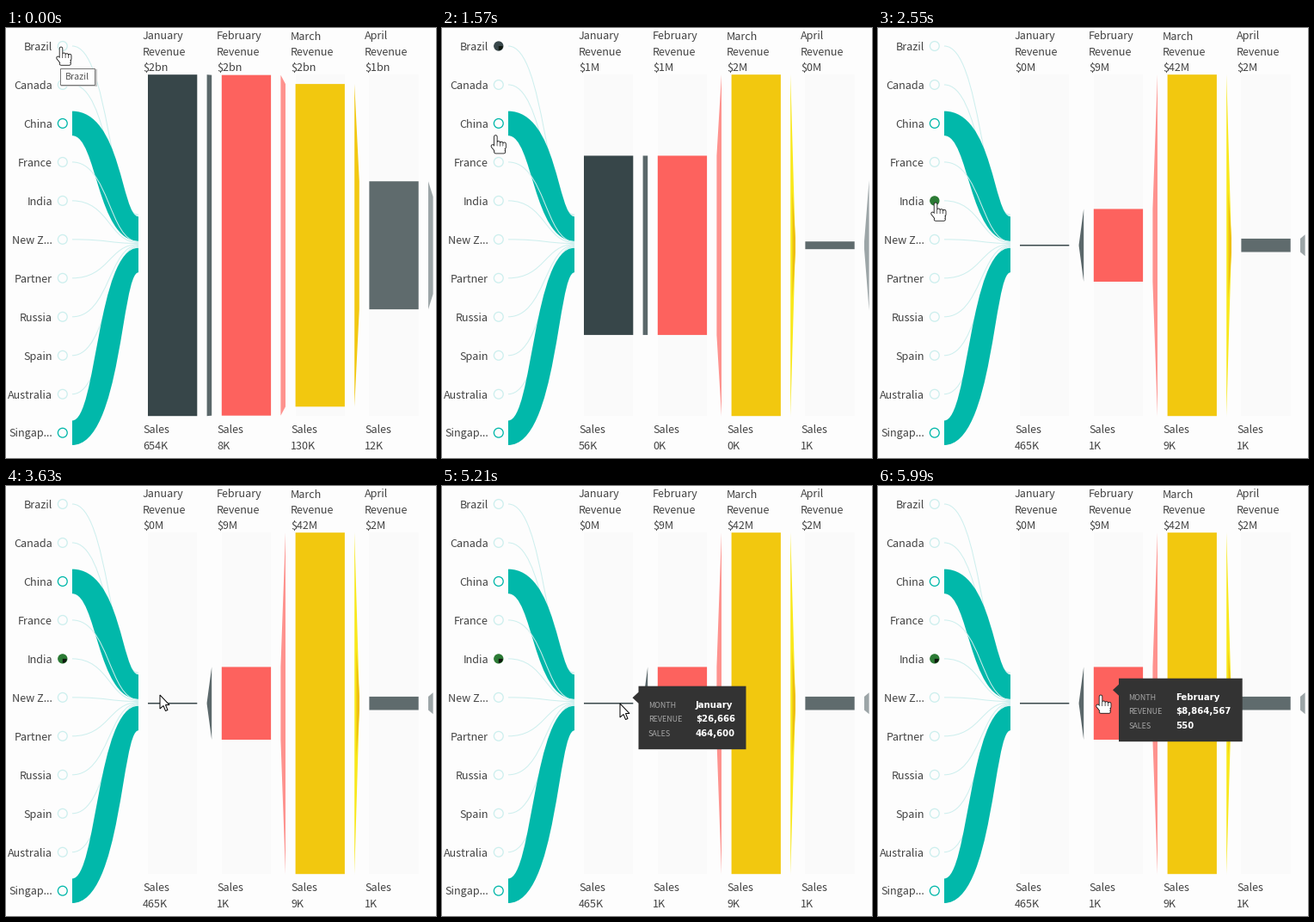
These frames come from a looping animation (500x500 px, 6630 ms). A matplotlib script:

```python
import numpy as np
import matplotlib.pyplot as plt
from matplotlib.animation import FuncAnimation
from matplotlib.patches import Circle, PathPatch, Polygon, Rectangle, Wedge
from matplotlib.path import Path

SIZE, DPI = 500, 100
LOOP, STEP = 6630, 30
PT = 72 / DPI  # points per pixel
MID, FULL = 252.7, 198.5  # centre and largest half height of the bars
PITCH, BAR_WIDTH = 85.8, 57.3
RIBBON = 28.5

TEAL, PALE, DARK, GREEN, BACK = "#01b8aa", "#cdefee", "#374649", "#2b7a34", "#fdfdfd"
BAR_COLORS = [DARK, "#fd625e", "#f2c80f", "#5f6b6d"]
LINK_COLORS = ["#5a676a", "#fe928e", "#f2c811", "#9ca5a7"]
SANS = ["Noto Sans CJK JP", "DejaVu Sans"]

COUNTRIES = ["Brazil", "Canada", "China", "France", "India", "New Z...",
             "Partner", "Russia", "Spain", "Australia", "Singap..."]
BIG = {"China": MID - 19.2, "Singap...": MID + 17.3}  # ribbon end heights
MONTHS = ["January", "February", "March", "April"]

# Revenue (the last month is off stage), its unit, sales in thousands
ALL = ([2, 1.995, 1.89, 0.75, 0.57], "bn", [654, 8, 130, 12])
BRAZIL = ([1.05, 1.05, 2, 0.045, 0.76], "M", [56, 0, 0, 1])
INDIA = ([0.027, 8.86, 41.6, 1.63, 2.62], "M", [465, 1, 9, 1])

# Pointer moves: start, end, new tip position
HOME = (64, 22)
MOVES = [(1030, 1700, (62, 147)), (1760, 2360, (67, 203)),
         (3530, 3680, (207, 253)), (5340, 5710, (259, 243))]

fig = plt.figure(figsize=(SIZE / DPI, SIZE / DPI), dpi=DPI, facecolor=BACK)
ax = fig.add_axes([0, 0, 1, 1])
ax.set(xlim=(0, SIZE), ylim=(SIZE, 0))
ax.axis("off")


def label(x, y, text, px=12.6, color="#444444", **kw):
    kw.setdefault("family", SANS)
    return ax.text(x, y, text, fontsize=px * PT, color=color, va="baseline", **kw)


def row_y(i):
    return 21 + 44.97 * i


def curve(y0, y1, bend=120):
    return [(77, y0), (bend, y0), (bend, y1), (154, y1)]


def thread(y0, y1, z):
    path = Path(curve(y0, y1), [Path.MOVETO] + [Path.CURVE4] * 3)
    ax.add_patch(PathPatch(path, fill=False, ec=PALE, lw=PT, zorder=z))


def ribbon(y0, y1, z):
    half = RIBBON / 2
    lean = half * np.sign(y1 - y0)
    top = curve(y0 - half, y1 - half, 120 + lean)
    bottom = curve(y0 + half, y1 + half, 120 - lean)[::-1]
    codes = [Path.MOVETO] + [Path.CURVE4] * 3 + [Path.LINETO] + [Path.CURVE4] * 3
    ax.add_patch(PathPatch(Path(top + bottom, codes), fc=TEAL, lw=0, zorder=z))


def shape(points, color, **kw):
    return ax.add_patch(Polygon(points, fc=color, **{"lw": 0, "snap": False, **kw}))


def trapezoid(x, width, half0, half1):
    return [(x, MID - half0), (x + width, MID - half1),
            (x + width, MID + half1), (x, MID + half0)]


def card(x, y, width, values):
    height = 73.5
    parts = [shape([(x, y), (x + width, y), (x + width, y + height), (x, y + height),
                    (x, y + 20), (x - 7, y + 13.5), (x, y + 7)], "#333333", zorder=20)]
    for i, (name, value) in enumerate(zip(("MONTH", "REVENUE", "SALES"), values)):
        base = y + 24.9 + 16.6 * i
        parts.append(label(x + 11.5, base, name, 8.9, "#a6a6a6", zorder=21))
        parts.append(label(x + 66.2, base, value, 10.1, "white",
                           family="DejaVu Sans", weight="bold", zorder=21))
    return parts


def fade(parts, alpha):
    for part in parts:
        part.set_alpha(alpha)
        part.set_visible(alpha > 0)


# Country list; later ribbons lie over earlier ones
rings = []
for i, name in enumerate(COUNTRIES):
    y, z = row_y(i), 1 + i / 20
    label(54, y + 4.8, name, ha="right")
    rings.append(ax.add_patch(Circle((65.8, y), 5.4, fc=BACK, lw=1.3 * PT, zorder=3,
                                     ec=TEAL if name in BIG else PALE)))
    if name in BIG:
        ribbon(y, BIG[name], z)
    else:
        thread(y, 245.5 + i - RIBBON * (i < 2), z)
shade = ax.add_patch(Wedge((0, 0), 5, 0, 90, fc="#10180f", lw=0, zorder=4))

# Funnel
bars, links, revenues, sales = [], [], [], []
for i, month in enumerate(MONTHS):
    text_x = 159 + 86 * i
    ax.add_patch(Rectangle((165 + PITCH * i, MID - FULL), BAR_WIDTH, 2 * FULL,
                           fc="#fafafa", lw=0, zorder=0))
    label(text_x, 13.5, month)
    label(text_x, 32, "Revenue")
    label(text_x, 471, "Sales")
    revenues.append(label(text_x, 49.5, ""))
    sales.append(label(text_x, 490, ""))
    bars.append(shape([(0, 0)] * 3, BAR_COLORS[i], zorder=2))
    links.append(shape([(0, 0)] * 3, LINK_COLORS[i], zorder=2))
link_core = shape(trapezoid(407.5, 3.5, 62, 8), "#eebf10", zorder=3)

# Tooltips
hint = [ax.add_patch(Rectangle((64, 48), 42, 20, fc="#c8c8c8", lw=0, zorder=18)),
        ax.add_patch(Rectangle((62.5, 46.5), 40, 19, fc="white", ec="#777777",
                               lw=PT, zorder=19)),
        label(68.5, 60, "Brazil", 10.6, "#575757", zorder=20)]
january = card(228.5, 232.7, 125, ("January", "$26,666", "464,600"))
february = card(280, 223.7, 143.7, ("February", "$8,864,567", "550"))


def hand_strokes():
    """Four fingers, a thumb and a palm as strokes, with the index finger tip at 0, 0."""
    fingers = [((3.4 * k, 8 + 0.7 * k if k else 1.8), (3.4 * k, 14)) for k in range(4)]
    palm = [((0, y), (9.6, y)) for y in (14.5, 17, 19.5)]
    strokes = fingers + palm + [((-3.5, 12.8), (0, 17))]
    return np.array([p for a, b in strokes for p in (a, b, (np.nan, np.nan))])


# Pointers: a white stroke over a wider black one makes the outlined hand
HAND = hand_strokes()
hand = [ax.plot([], [], color=color, lw=width * PT, solid_capstyle="round", zorder=z)[0]
        for color, width, z in (("#222222", 4.5, 30), ("white", 2.7, 31))]
ARROW = np.array([(0, 0), (0, 16), (4, 12.5), (6.5, 18.5), (9, 17.5),
                  (6.5, 11.5), (11, 11.5)])
arrow = shape(ARROW, "white", ec="black", lw=PT, zorder=30)


def show_data(state):
    amounts, unit, sold = state
    halves = [max(0.75, FULL * a / max(amounts)) for a in amounts]
    for i in range(len(MONTHS)):
        x = 165 + PITCH * i
        bars[i].set_xy(trapezoid(x, BAR_WIDTH, halves[i], halves[i]))
        links[i].set_xy(trapezoid(x + 68.6, 5.6, halves[i], halves[i + 1]))
        revenues[i].set_text(f"${amounts[i]:.0f}{unit}")
        sales[i].set_text(f"{sold[i]}K")
    links[2].set_facecolor(LINK_COLORS[2] if state is ALL else "#f9e81c")
    link_core.set_visible(state is not ALL)


def show_selection(t):
    for row, color, chosen in ((0, DARK, 360 <= t < 2550), (4, GREEN, t >= 2550)):
        rings[row].set(fc=color if chosen else BACK, ec=color if chosen else PALE,
                       radius=5 if chosen else 5.4)
    shade.set_visible(1050 <= t < 2550 or t >= 3580)
    shade.set_center((65.8, row_y(0 if t < 2550 else 4)))


def pointer_tip(t):
    tip = np.array(HOME, float)
    for start, end, goal in MOVES:
        tip += (np.array(goal) - tip) * np.clip((t - start) / (end - start), 0, 1)
    return tip


def show_pointer(t):
    tip = pointer_tip(t)
    is_arrow = 70 < tip[0] < 251
    arrow.set_xy(ARROW + tip)
    arrow.set_visible(is_arrow)
    for line in hand:
        line.set_data(*(HAND + tip).T)
        line.set_visible(not is_arrow)


def update(frame):
    t = frame * STEP + 20  # sampled late in the frame's interval
    show_data(ALL if t < 360 else BRAZIL if t < 2550 else INDIA)
    show_selection(t)
    show_pointer(t)
    fade(hint, np.interp(t, [350, 540], [1, 0]))
    fade(january, np.interp(t, [3990, 4140, 5350, 5540, 5620], [0, 1, 1, 0.1, 0]))
    fade(february, float(t >= 5990))
    return []


animation = FuncAnimation(fig, update, frames=LOOP // STEP, interval=STEP,
                          init_func=lambda: update(0), repeat=True, repeat_delay=0,
                          blit=False)
plt.show()
```
